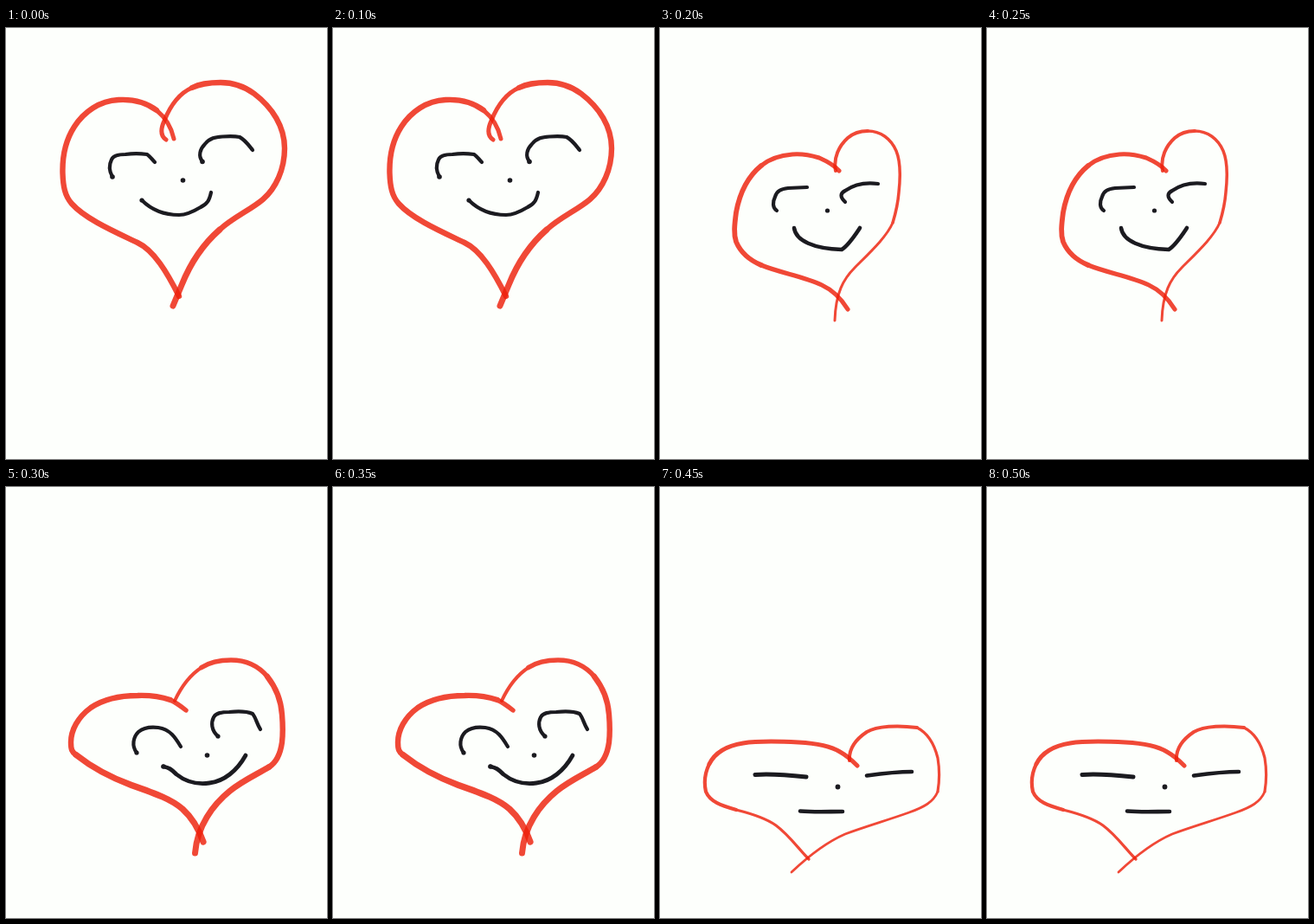
Recreate the animation shown at these times as an HTML page. Size 371 px wide and 498 px high, loop 0.55 s.

```html
<!DOCTYPE html>
<html lang="en">
<head>
<meta charset="utf-8">
<title>Bouncing heart</title>
<style>
  html, body { margin: 0; width: 100%; height: 100%; overflow: hidden; background: #fdfffc; }
  svg { display: block; width: 371px; height: 498px; }
  path { fill: none; stroke-linecap: round; stroke-linejoin: round; }
  .red { stroke: #ee1e09; opacity: .81; stroke-width: 6.4; }
  .ink { stroke: #1b1b20; stroke-width: 4.2; }
  .ink circle { fill: #1b1b20; stroke: none; }
  .pose { visibility: hidden; animation: hold 550ms step-end infinite; }
  .fall { animation-delay: -400ms; }
  .low { animation-delay: -250ms; }
  .flat { animation-name: rest; animation-delay: -100ms; }
  @keyframes hold { 0% { visibility: visible; } 27.2727%, 100% { visibility: hidden; } }
  @keyframes rest { 0% { visibility: visible; } 18.1818%, 100% { visibility: hidden; } }
</style>
</head>
<body>
<svg viewBox="0 0 371 498">
  <g class="pose high">
    <g class="red">
      <path stroke-width="5" d="M194 128C191 114 185 104 174 95"/>
      <path d="M174 95C162 86 147 82 130 83C108 84 90 97 79 114C68 131 65 150 65.5 168C66 183 68 194 76 203C92 221 127 236 152 248C171 257 186 282 200 310"/>
    </g>
    <g class="red">
      <path stroke-width="5" d="M185 129C179 125 178 118 183 107C189 92 199 76 215 69"/>
      <path d="M215 69C225 64 237 63 248 63C262 63 275 67 287 76C308 92 322 114 322 139C322 163 312 185 297 198C283 210 262 219 247 233"/>
      <path stroke-width="7" d="M247 233C223 254 211 277 203 297L193 321"/>
    </g>
    <g class="ink">
      <path d="M123 172C119 165 119 158 122 152C124 147 130 146 138 146C146 145 155 145 163 146C166 148 169 152 172 155"/>
      <path d="M227 154C222 148 224 140 230 134C236 127 242 126 250 125.5C258 125 265 125 270 126C276 129 281 136 285 141"/>
      <path d="M157 199C168 210 183 216 200 216C208 216 215 213 225 207C233 203 235 199 237 190"/>
      <circle cx="123" cy="172" r="2.8"/>
      <circle cx="227" cy="154.5" r="2.8"/>
      <circle cx="157" cy="199" r="2.6"/>
      <circle cx="204.5" cy="176" r="2.8"/>
    </g>
  </g>

  <g class="pose fall">
    <g class="red">
      <path stroke-width="5" d="M207 165C201 158 193 154 184 150C174 147 164 145 153 146C140 147 128 150 117 159"/>
      <path stroke-width="5.8" d="M117 159C101 172 92 191 88 213C86 228 85 238 88 247C93 259 103 268 117 274"/>
      <path stroke-width="5.2" d="M117 274C139 283 166 287 187 297C200 303 209 312 217 325"/>
    </g>
    <g class="red">
      <path stroke-width="4" d="M203 165C200 150 207 136 217 127C224 121 232 119 240 119"/>
      <path stroke-width="3.5" d="M240 119C255 119 267 128 273 142C278 154 278 172 276 190C275 203 272 215 269 225"/>
      <path stroke-width="3" d="M269 225C262 241 245 257 225 277C212 290 203 306 202 338"/>
    </g>
    <g class="ink">
      <path d="M135 211C130 208 130 201 133 195C135 188 140 186 148 185L170 184"/>
      <path d="M214 201C208 195 208 191 214 188C224 181 237 178 252 180"/>
      <path stroke-width="4.6" d="M155 231C157 246 178 255 210 256C218 251 225 240 231 231"/>
      <circle cx="193.5" cy="211" r="2.6"/>
    </g>
  </g>

  <g class="pose low">
    <g class="red">
      <path stroke-width="5.4" d="M208 258C203 254 198 250 190 246"/>
      <path d="M190 246C178 242 165 240.500 152 241C131 241 113 245 98 255C83 266 75 281 75 295C75 303 76 306 81 309.500"/>
      <path stroke-width="7.2" d="M81 309.500C98 323 122 336 145 344.500C175 355 191 361 204 372C214 381 222 393 228 410"/>
    </g>
    <g class="red">
      <path stroke-width="4" d="M195 247C202 232 213 217 226 208.500"/>
      <path stroke-width="5.600" d="M226 208.500C236 202 248 200 260 200C277 200 292 207 302 219"/>
      <path d="M302 219C313 233 318 248 319 263C320 275 320 286 319 295C317 309 313 318 304 323.500"/>
      <path stroke-width="7" d="M304 323.500C290 332 274 339 259 351C239 367 221 392 218.500 423"/>
    </g>
    <g class="ink">
      <path d="M151 307C145 299 147 289 153 283C159 278 168 277 176 278C190 280 196 290 202 300"/>
      <path d="M245 288C237 281 237 272 240 266C243 261 249 260 258 260C267 259 278 259 285 262C289 267 290 274 294 280"/>
      <path stroke-width="4.8" d="M182 323C188 324 191 326 197 332C207 340 220 344 235 342C252 340 267 328 277 310"/>
      <circle cx="151" cy="307" r="2.6"/>
      <circle cx="245" cy="288" r="2.6"/>
      <circle cx="182" cy="323" r="2.8"/>
      <circle cx="232.500" cy="310" r="2.8"/>
    </g>
  </g>

  <g class="pose flat">
    <g class="red">
      <path stroke-width="5" d="M228 322C222 316 217 311 208 306C195 298 178 296 160 295C140 294 115 293 96 296C77 299 64 306 57 320"/>
      <path stroke-width="4.2" d="M57 320C51 332 51 343 53 352C58 364 71 368 88 373"/>
      <path stroke-width="3.2" d="M88 373C108 378 123 383 134 391C149 402 160 418 172 430"/>
    </g>
    <g class="red">
      <path stroke-width="4" d="M219 316C218 302 227 291 239 283C251 276 275 275 297 278"/>
      <path stroke-width="3.2" d="M297 278C309 284 317 297 321 313C323 325 323 340 321 352"/>
      <path stroke-width="2.8" d="M321 352C316 364 305 370 288 376C263 385 238 392 214 401C191 411 170 428 152 445"/>
    </g>
    <g class="ink">
      <path stroke-width="5" d="M110 332.5C130 331 150 333 169 335"/>
      <path stroke-width="4.6" d="M239 333.5C257 331 274 329 291 329"/>
      <path stroke-width="4.6" d="M162 374.5C180 376 195 375 211 375"/>
      <circle cx="205.5" cy="346.5" r="2.9"/>
    </g>
  </g>
</svg>
</body>
</html>
```
